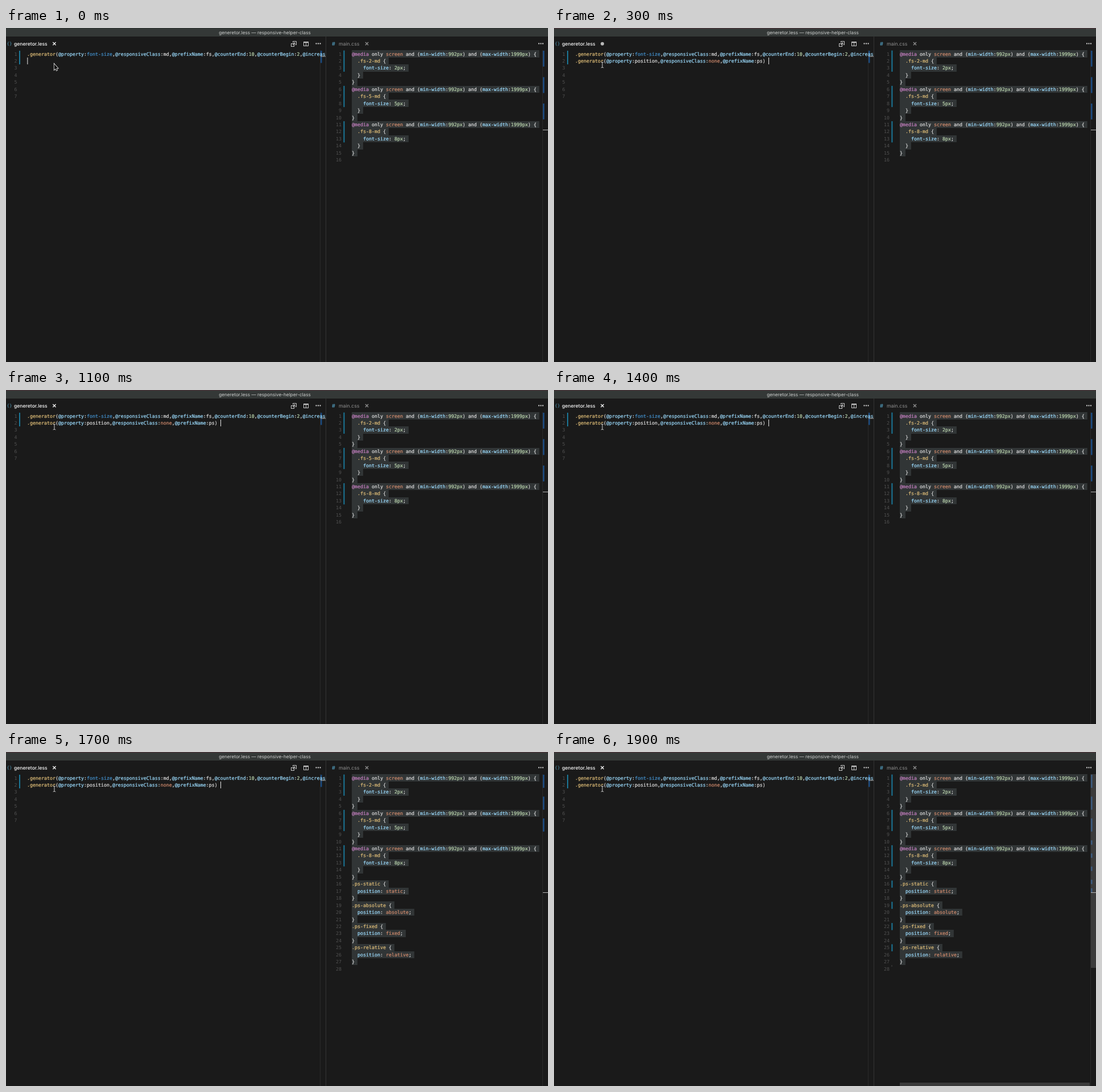
Write an HTML page with a canvas that moves like this. It is 953 px wide and 588 px high and loops after 6.9 s.

```html
<!DOCTYPE html>
<html lang="en">
<head>
<meta charset="utf-8">
<title>Less generator</title>
<style>
html, body { margin: 0; width: 100%; height: 100%; overflow: hidden; background: #1a1a1a; }
canvas { display: block; }
</style>
</head>
<body>
<canvas id="stage" width="953" height="588"></canvas>
<script>
const ctx = document.getElementById('stage').getContext('2d');
const LOOP = 6900, PASTE = 200, SAVE = 500, COMPILE = 1700, SETTLE = 1900;
const CHAR = 4.996, ROW = 12.45, TOP = 39.3;
const MONO = '8.3px "DejaVu Sans Mono", monospace';
const UI = 'Inter, sans-serif';

const less = [
  '.generator(@property:font-size,@responsiveClass:md,@prefixName:fs,@counterEnd:10,@counterBegin:2,@increase:3);',
  '.generator(@property:position,@responsiveClass:none,@prefixName:ps) '
];
const sizes = [2, 5, 8].flatMap(n => [
  '@media only screen and (min-width:992px) and (max-width:1999px) {',
  `  .fs-${n}-md {`, `    font-size: ${n}px;`, '  }', '}'
]);
const positions = ['static', 'absolute', 'fixed', 'relative'].flatMap(p => [
  `.ps-${p} {`, `  position: ${p};`, '}'
]);

// Each capture group has the colour at the same index.
const TOKEN = /(@media)|(@\w+|(?:min-width|max-width|font-size|position)(?=:))|(\.[a-z][\w-]*)|(font-size)|(screen|none|static|absolute|fixed|relative)|(\d+(?:px)?)|\w+|./g;
const COLORS = ['#dedede', '#c57fc0', '#9cdcfe', '#dfbd78', '#4390cc', '#cf8a6c', '#b9d3ac'];

function rect(x, y, w, h, color) {
  ctx.fillStyle = color;
  ctx.fillRect(x, y, w, h);
}

function text(str, x, y, color, font, align = 'left') {
  ctx.font = font;
  ctx.textAlign = align;
  ctx.fillStyle = color;
  ctx.fillText(str, x, y);
}

function line(points, color, width = 1, close = false) {
  ctx.beginPath();
  points.forEach(([x, y]) => ctx.lineTo(x, y));
  if (close) ctx.closePath();
  ctx.strokeStyle = color;
  ctx.lineWidth = width;
  ctx.stroke();
}

function dot(x, y, r, color) {
  ctx.beginPath();
  ctx.arc(x, y, r, 0, 7);
  ctx.fillStyle = color;
  ctx.fill();
}

function code(str, x, row) {
  const y = TOP + ROW * row + 9.2;
  for (const m of str.matchAll(TOKEN)) {
    const kind = m.slice(1).findIndex(Boolean) + 1;
    const tx = x + m.index * CHAR;
    text(m[0], tx, y, COLORS[kind], MONO);
    ctx.strokeStyle = COLORS[kind];
    ctx.lineWidth = 0.22;
    ctx.strokeText(m[0], tx, y);
  }
}

function numbers(count, right) {
  for (let i = 0; i < count; i++)
    text(i + 1, right, TOP + ROW * i + 9.2, '#505050', MONO, 'right');
}

function cross(x, y, color) {
  line([[x - 2.6, y - 2.6], [x + 2.6, y + 2.6]], color, 1.4);
  line([[x + 2.6, y - 2.6], [x - 2.6, y + 2.6]], color, 1.4);
}

function ellipsis(x) {
  for (const d of [-3.5, 0, 3.5]) dot(x + d, 27.5, 1.15, '#cfcfcf');
}

function header(t) {
  rect(0, 0, 953, 15, '#343837');
  rect(0, 0, 953, 1, t < 100 ? '#2b302e' : '#482f35');
  text('generetor.less — responsive-helper-class', 455, 10.7, '#cdcfce', `8.2px ${UI}`, 'center');

  text('{}', 1.5, 30, '#519aba', '7.5px "DejaVu Sans Mono", monospace');
  text('generetor.less', 14, 30.7, '#fafafa', `500 8.6px ${UI}`);
  if (t >= PASTE && t < SAVE) dot(85, 27.7, 3, '#b8b8b8');
  else cross(85, 27.7, '#eeeeee');

  text('#', 573, 30.7, '#519aba', `600 9px ${UI}`);
  text('main.css', 585, 30.7, '#909090', `8.7px ${UI}`);
  cross(634.5, 27.7, '#8c8c8c');

  // Toolbar: compare, split, more
  const tint = '#c8c8c8';
  ctx.strokeStyle = tint;
  ctx.lineWidth = 1;
  ctx.strokeRect(501.5, 27.5, 5, 5);
  line([[504.5, 25.5], [504.5, 23.5], [510.5, 23.5], [510.5, 29.5], [508.5, 29.5]], tint);
  line([[504, 30], [508, 26]], tint);
  line([[505.5, 26], [508, 26], [508, 28.5]], tint);
  ctx.strokeRect(523.5, 24.5, 8, 7);
  line([[527.5, 24], [527.5, 32]], tint);
  rect(523, 24, 9, 2, tint);
  ellipsis(549);
  ellipsis(940.5);
}

function leftPane(t) {
  const pasted = t >= PASTE;
  ctx.save();
  ctx.beginPath();
  ctx.rect(0, 15, 562, 573);
  ctx.clip();
  rect(552, 39, 1, 549, '#2a2a2a');
  rect(553, 40, 2.5, 21.5, '#1b4a80');
  rect(23, 40, 2, 24, '#1b7798');
  numbers(7, 19.5);
  less.slice(0, pasted ? 2 : 1).forEach((s, i) => code(s, 37, i));
  rect(553, 49.5, 9, 1, '#b5b5b5');
  if (t < SETTLE) rect(pasted ? 377 : 37.3, 52, 1.1, 12, '#d8d8d8');
  ctx.restore();
}

function rightPane(t) {
  const compiled = t >= COMPILE, settled = t >= SETTLE;
  const rows = compiled ? [...sizes, ...positions] : sizes;
  const unit = compiled ? 7.7 : 9.3;
  const marks = [[0, 3], [5, 3], [10, 3]];
  if (settled) marks.push([15, 1], [18, 1], [21, 1], [24, 1]);

  rect(562, 15, 1, 573, '#343434');
  rect(943, 39, 1, 549, '#2a2a2a');
  for (const [row, count] of marks) {
    rect(593.4, TOP + ROW * row + 0.3, 2, ROW * count, '#1b7798');
    rect(944, 40 + unit * row, 2.6, unit * count, '#1b4a80');
  }
  if (settled) {
    rect(944, 240, 2.6, 8, '#1b4a80');
    rect(593.5, 375, 1, 3, '#444444');
  }
  rows.forEach((s, i) => {
    const y = Math.round(TOP + ROW * i), end = Math.round(TOP + ROW * (i + 1));
    rect(608, y, (s.length + 1) * CHAR, end - y, '#313536');
    code(s, 608, i);
  });
  numbers(rows.length + 1, 590);
  if (settled) {
    rect(944, 39, 9, 341, 'rgba(121,121,121,.35)');
    rect(608, 582, 334, 6, 'rgba(121,121,121,.35)');
  }
  rect(944, Math.floor(40 + unit * rows.length), 9, 1, '#b5b5b5');
}

function pointer(t) {
  if (t < PASTE) {
    const tip = [[84.7, 63.2], [84.7, 73.6], [87, 71.5], [88.6, 75], [90, 74.3], [88.5, 71], [91.4, 70.8]];
    line(tip, '#e8e8e8', 1.6, true);
    ctx.fillStyle = '#111';
    ctx.fill();
  } else {
    line([[85, 60.5], [85, 69.5]], '#d0d0d0');
    line([[82.7, 60], [85, 60.8], [87.3, 60]], '#d0d0d0', 0.9);
    line([[82.7, 70], [85, 69.2], [87.3, 70]], '#d0d0d0', 0.9);
  }
}

function frame(now) {
  const t = now % LOOP;
  ctx.textRendering = 'geometricPrecision';
  rect(0, 0, 953, 588, '#1a1a1a');
  header(t);
  leftPane(t);
  rightPane(t);
  pointer(t);
  requestAnimationFrame(frame);
}
frame(0);
</script>
</body>
</html>
```
